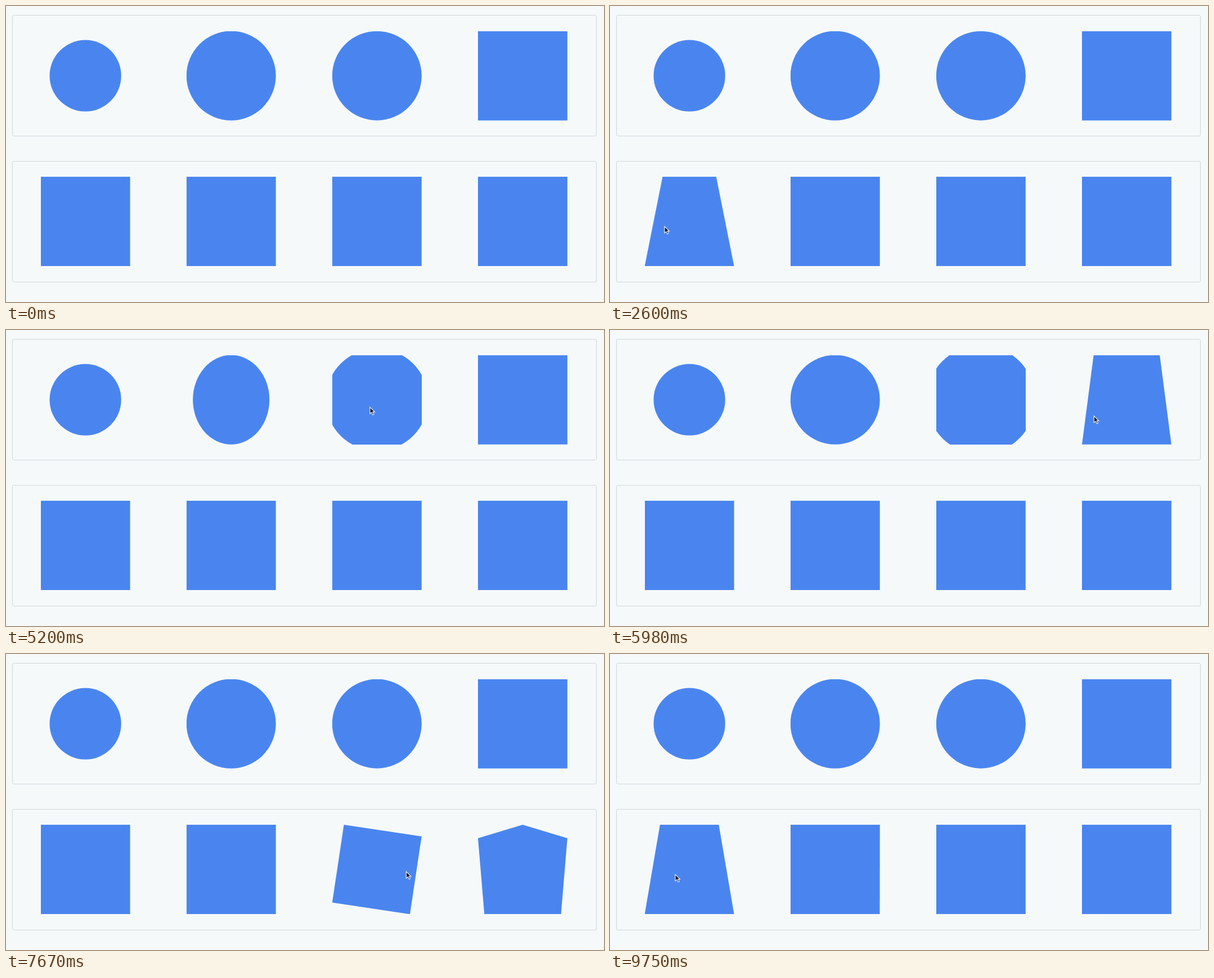
Recreate the animation shown at these times as an HTML page. Size 1063 px wide and 527 px high, loop 9880 ms.

```html
<!DOCTYPE html>
<html lang="en">
<head>
<meta charset="utf-8">
<title>Hover shapes</title>
<style>
  html, body { margin: 0; width: 100%; height: 100%; overflow: hidden; background: #f5f9fa; }
  .panel { position: absolute; left: 11px; width: 1039px; height: 216px; box-sizing: border-box;
    border: 1px solid #d0d6d8; border-radius: 3px; }
  .shape { position: absolute; background: #4a85ef; }
  #cursor { position: absolute; left: 0; top: 0; width: 14px; height: 18px; overflow: visible; }
</style>
</head>
<body>
<div class="panel" style="top:16px"></div>
<div class="panel" style="top:276px"></div>
<svg id="cursor"><path d="M0 .5V12L3 9.6L5 14L7 13.1L5.1 8.8H8.4Z" fill="#0b1220" stroke="#e8eefa" stroke-width="1.2"/></svg>
<script>
const LOOP = 9880, STEP = 130, FADE = 800;
const WIDTH = 158.9, HEIGHT = 159.1, PITCH_X = 259.1, PITCH_Y = 259.5;
const cursor = document.getElementById('cursor');
const mix = (a, b, p) => a + (b - a) * p;

// CSS "ease": cubic-bezier(.25, .1, .25, 1)
function ease(x) {
  if (x <= 0) return 0;
  if (x >= 1) return 1;
  let lo = 0, hi = 1, u;
  for (let i = 0; i < 24; i++) {
    u = (lo + hi) / 2;
    if (.75 * u * (1 - u) + u ** 3 < x) lo = u; else hi = u;
  }
  return .3 * u * (1 - u) ** 2 + 3 * u * u * (1 - u) + u ** 3;
}

// Each clip is a function of the hover amount p, from 0 to 1
const polygon = (...points) => `polygon(${points.map(([x, y]) => `${x}% ${y}%`)})`;
const circle = (from, to) => p => `circle(${mix(from, to, p)}%)`;
const wedge = inset => p =>
  polygon([inset * p, 0], [100 - inset * p, 0], [100, 100], [0, 100]);
const ellipse = p => `ellipse(${50 - 25 * p}% 50%)`;
const parallelogram = p =>
  polygon([25 * p, 0], [100, 0], [100 - 25 * p, 100], [0, 100]);
const rhombus = p =>
  polygon([50 * p, 0], [100, 50 * p], [100 - 50 * p, 100], [0, 100 - 50 * p]);
const pentagon = p =>
  polygon([50, 0], [100, 38 * p], [100 - 18 * p, 100], [18 * p, 100], [0, 38 * p]);

// Cursor key points: time, x, y
const path = [
  [265, 120, -20], [450, 125, 125], [1690, 125, 125], [1790, 112, 304],
  [2050, 97, 392], [2730, 97, 392], [3060, 115, 203], [3200, 140, 137],
  [3890, 190, 137], [4050, 321, 137], [4160, 366, 137], [4790, 441, 137],
  [5042, 580, 137], [5200, 647, 137], [5680, 703, 138], [5830, 839, 145],
  [6470, 930, 178], [6674, 934, 304], [6760, 935, 320], [7340, 877, 387],
  [7520, 739, 387], [8300, 596, 387], [8575, 480, 387], [9300, 221, 391], [9750, 116, 392]
];

function cursorAt(t) {
  const next = path.findIndex(key => key[0] >= t);
  if (next < 1) return path.at(next).slice(1);
  const [t0, x0, y0] = path[next - 1], [t1, x1, y1] = path[next];
  const p = (t - t0) / (t1 - t0);
  return [mix(x0, x1, p), mix(y0, y1, p)];
}

// Times at which the cursor enters and leaves a shape, in turn
function crossings(left, top) {
  const times = [];
  for (let t = 0; t < LOOP; t += 2) {
    const [x, y] = cursorAt(t);
    const inside = x > left && x < left + WIDTH && y > top && y < top + HEIGHT;
    if (inside !== (times.length % 2 === 1)) times.push(t);
  }
  return times;
}

const shapes = [
  circle(40, 50), ellipse, circle(50, 75), wedge(50),
  wedge(20), parallelogram, rhombus, pentagon
].map((clip, i) => {
  const left = 61.7 + PITCH_X * (i % 4), top = 44.6 + PITCH_Y * Math.floor(i / 4);
  const el = document.createElement('div');
  el.className = 'shape';
  el.style.cssText = `left:${left}px; top:${top}px; width:${WIDTH}px; height:${HEIGHT}px`;
  document.body.insertBefore(el, cursor);
  return { el, clip, times: crossings(left, top) };
});

function draw() {
  const t = Math.floor(performance.now() % LOOP / STEP) * STEP;
  for (const { el, clip, times } of shapes) {
    const hover = times.reduce((sum, start, i) =>
      sum + (i % 2 ? -1 : 1) * ease((t - start) / FADE), 0);
    el.style.clipPath = clip(hover);
  }
  const [x, y] = cursorAt(t);
  cursor.style.transform = `translate(${x}px, ${y}px)`;
  requestAnimationFrame(draw);
}
draw();
</script>
</body>
</html>
```
